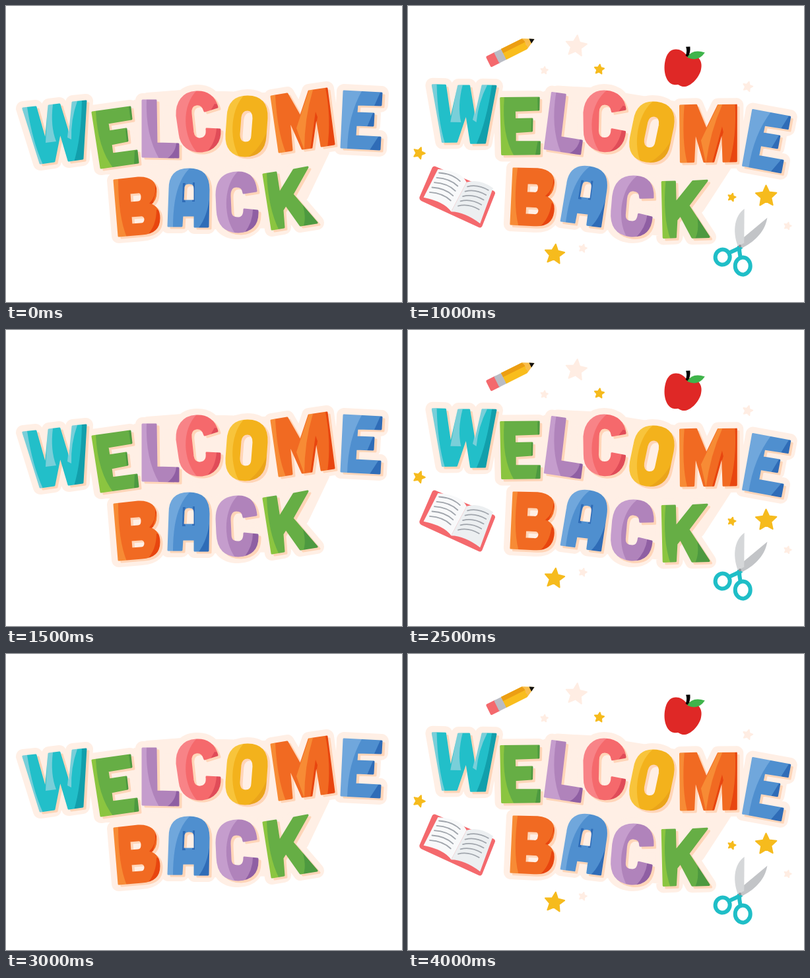
Animation, 600 px wide and 448 px high, one loop 5 s. Source, as an HTML page:

```html
<!DOCTYPE html>
<html lang="en">
<head>
<meta charset="utf-8">
<title>Welcome back</title>
<style>
html, body { margin: 0; width: 100%; height: 100%; overflow: hidden; background: #fff; }
svg { display: block; width: 600px; height: 448px; }
</style>
</head>
<body>
<svg viewBox="0 0 600 448" aria-label="Welcome back">
  <g id="scene">
    <g id="lettering" stroke-linejoin="round"></g>
    <!-- Props are laid out in the left-leaning pose -->
    <g id="props" transform="rotate(7.5 300 224)">
      <g id="stars" stroke-width="2" stroke-linejoin="round"></g>

      <g transform="translate(97 131) rotate(-41.5)">
        <path fill="#f4696d" d="M-5-9H9V9H-5Q-7 9-7 7V-7Q-7-9-5-9Z"/>
        <path fill="#b9bcc4" d="M7-9H20V9H7Z"/>
        <path fill="#f9bd1d" d="M19-9H54L71 0 54 9H19Z"/>
        <path fill="#ec9e13" d="M19-9H54L60-2H19Z"/>
        <path fill="#f8bd4c" d="M54-9L71 0 54 9Q58 5 55 2 58-2 54-9Z"/>
        <path fill="#111" d="M64-4L71 0 64 4Z"/>
      </g>

      <path fill="#df2826" d="M378 47C369 40 350 40 350 62C350 80 360 97 372 96C376 96 377 93 381 95C393 99 406 80 406 64C406 46 390 41 378 47Z"/>
      <path fill="#050505" d="M375 36L381 34Q384 42 382 50L378 49Q379 42 375 36Z"/>
      <path fill="#3fb44b" d="M381 51Q385 36 405 37Q399 54 381 51Z"/>

      <path fill="#f4696d" d="M55 309L150 322Q154 323 153 327L147 378Q146 382 142 381L48 365Q44 364 44 360L51 312Q52 309 55 309Z"/>
      <path fill="#f8f9fa" d="M60 312Q94 305 107 320L96 369Q82 357 50 359Z"/>
      <path fill="#eceff1" d="M107 320Q124 309 148 318L143 375Q116 364 96 369Z"/>
      <g id="lines" fill="none" stroke="#a0a5ac" stroke-width="1.8" stroke-linecap="round"></g>

      <g fill="none" stroke="#1fbec7" stroke-width="6">
        <ellipse cx="511" cy="329" rx="11" ry="11.5"/>
        <ellipse cx="544" cy="334" rx="11.5" ry="13" transform="rotate(-15 544 334)"/>
        <path d="M535 306Q528 313 519 320M531 306Q533 314 537 322"/>
      </g>
      <path fill="#c2c4c7" d="M561 254C563 274 553 293 536 308L527 302Z"/>
      <path fill="#d5d7d9" d="M524 250C513 263 514 286 529 307L537 300Z"/>
      <circle cx="532" cy="306" r="2" fill="#8d9298"/>
    </g>
  </g>
</svg>
<script>
const $ = id => document.getElementById(id);

const teal = ['#22bfc9', '#79cfd9', '#129fab'];
const green = ['#66ae45', '#8bc540', '#4d9940'];
const purple = ['#b083bb', '#c59dcd', '#8f5fa3'];
const coral = ['#f5696c', '#f88387', '#e04c58'];
const yellow = ['#f3b21c', '#f8c43b', '#eaa41a'];
const orange = ['#f16a22', '#f78b35', '#e8450f'];
const blue = ['#4f8fcf', '#70a7dc', '#2f6cb7'];

// Each letter: palette, outline, lit area, shaded area
const letters = [
  [teal, 'M26 155L45 153 60 206 65 151 81 149 96 198 101 146 121 144 116 231 95 234 82 190 73 235 52 238Z',
    'M24 153H32Q40 205 56 240H48ZM63 149H71Q67 182 76 205L60 207ZM99 144H108Q98 172 99 202L93 199Z',
    'M123 142H115Q114 200 103 236H119Z'],
  [green, 'M131 161L188 153 190 171 154 177 156 190 182 186 184 204 159 209 161 224 198 219 200 237 144 245Z',
    'M128 158L136 159Q139 216 163 246L142 248Z',
    'M190 151L186 153 189 173 193 173ZM184 185L181 186 183 206 187 205ZM200 218L195 219 194 240 203 238Z'],
  [purple, 'M207 143L227 143 228 208 261 209 261 229 207 228Z',
    'M205 141H213Q211 195 232 231H205Z',
    'M264 207H258Q257 222 244 231H264Z'],
  [coral, 'M320 153C316 137 304 129 288 130C268 131 258 146 259 166L263 193C265 212 279 221 297 220C315 218 325 206 324 187L304 186C305 194 302 200 295 201C288 202 284 198 283 191L280 163C279 155 282 150 288 149C295 148 299 152 301 159Z',
    'M290 127C265 150 267 200 292 224L255 222V127Z',
    'M326 184H319Q318 207 303 222L328 215ZM322 149L316 148 309 160 322 156Z'],
  [yellow, 'M366 137C386 137 396 148 395 170L393 197C392 217 381 227 362 227C342 226 333 215 334 194L336 167C337 147 346 137 366 137ZM366 157C359 157 356 161 355 168L353 194C353 202 356 207 363 207C369 207 373 203 373 196L375 170C375 161 372 157 366 157Z',
    'M362 134C342 152 336 198 354 230H330V134Z',
    'M397 185Q388 213 366 229H397Z'],
  [orange, 'M402 137L426 133 446 168 459 129 486 125 497 209 478 212 470 164 463 214 449 216 429 171 433 218 414 221Z',
    'M399 135L408 135Q411 190 424 222L411 224ZM459 127L465 127Q452 170 452 218L440 185Z',
    'M489 122L484 124Q493 170 487 214L501 212ZM469 160L472 168 464 217 461 217Z'],
  [blue, 'M512 129L569 132 568 150 532 149 531 162 557 163 556 181 530 180 529 197 567 199 566 217 508 214Z',
    'M509 127H540Q518 165 517 217H505Z',
    'M572 130L567 131 558 151 571 153ZM560 161L556 162 547 183 559 183ZM570 197L564 198 551 218 569 220Z'],
  [orange, 'M164 264L200 260C219 259 227 268 227 281C227 290 225 296 218 300C228 304 232 310 232 321C232 337 223 344 206 345L171 348ZM187 283L199 282C204 281 206 284 206 289C206 294 204 297 200 297L188 298ZM189 318L203 317C208 316 211 319 211 323C211 328 208 330 204 330L190 331Z',
    'M161 261L170 262Q170 318 183 350L168 351Z',
    'M235 310L228 308Q228 333 213 348L235 343ZM229 273L226 272Q228 288 217 299L222 300Z'],
  [blue, 'M248 277C248 256 258 247 277 247C297 247 307 256 307 278L306 334 286 334 286 317 267 317 266 333 246 333Z M277 268C271 268 269 271 269 277L268 295 286 295 286 278C286 271 284 268 277 268Z',
    'M280 244C258 264 253 300 253 336H243V244Z',
    'M309 285Q306 318 291 337H309ZM268 268L272 268Q267 282 272 297L267 297ZM283 267L286 267V296H282Z'],
  [purple, 'M379 280C377 260 367 251 350 252C329 253 319 264 319 286L320 308C321 331 331 342 352 342C372 341 382 331 381 310L361 308C361 317 358 321 351 321C343 321 340 317 340 309L339 287C339 278 342 273 349 273C356 273 359 276 360 283Z',
    'M353 249C330 268 327 318 348 345H315V249Z',
    'M384 308L374 308Q374 327 361 344H384Z'],
  [green, 'M390 255L409 252 414 284 436 248 457 244 434 285 471 328 446 332 424 301 419 309 421 335 403 338Z',
    'M387 253L395 253Q397 306 414 340L401 341Z',
    'M449 299Q456 321 450 335L475 330Z']
];

function letter([[main, light, dark], d, lit, shaded], i) {
  return `<mask id="m${i}" maskUnits="userSpaceOnUse" x="0" y="0" width="600" height="448">
      <path d="${d}" fill="#fff" stroke="#fff" stroke-width="3" fill-rule="evenodd"/></mask>
    <g mask="url(#m${i})"><path d="M0 0H600V448H0Z" fill="${main}"/>
      <path d="${lit}" fill="${light}"/><path d="${shaded}" fill="${dark}"/></g>`;
}

const outlines = letters.map(l => l[1]).join('');
const backing = 'M215 142L266 138 395 142 480 218 448 285 405 325 180 330 168 245 140 190Z';
$('lettering').innerHTML =
  `<path d="${outlines}${backing}" fill="#ffefe5" stroke="#ffefe5" stroke-width="22"/>
   <path d="${outlines}" fill="#ffd5b8" stroke="#ffd5b8" stroke-width="3" fill-rule="evenodd" transform="translate(4 3)"/>` +
  letters.map(letter).join('');

function star(color, x, y, r, turn) {
  const points = Array.from({ length: 10 }, (_, i) => {
    const a = (i * 36 + turn - 90) * Math.PI / 180, q = i % 2 ? r * 0.48 : r;
    return [x + q * Math.cos(a), y + q * Math.sin(a)].map(v => v.toFixed(1));
  });
  return `<polygon points="${points.join(' ')}" fill="${color}" stroke="${color}"/>`;
}

const gold = '#f6bb1d', blush = '#ffede3';
$('stars').innerHTML = [
  [gold, 257, 103, 7.5, -8], [gold, 26, 296, 9, 5], [gold, 551, 223, 16.5, -16],
  [gold, 501, 238, 6, 0], [gold, 264, 391, 15.5, -8],
  [blush, 214, 78, 16.5, -8], [blush, 177, 126, 5.5, -8], [blush, 481, 70, 7.5, 0],
  [blush, 303, 371, 6, 0], [blush, 594, 258, 5.5, 0]
].map(s => star(...s)).join('');

$('lines').innerHTML = Array.from({ length: 5 }, (_, i) => {
  const x = 63 - i * 1.5, y = 317 + i * 8;
  return `<path d="M${x} ${y}q20-4 34 4M${x + 47} ${y + 9}q14-8 32-3"/>`;
}).join('');

// Straight without props, then leaning left, then right; the last pose holds twice as long
const angles = [0, -7.5, 7.5];
function draw() {
  const step = Math.min(Math.floor(performance.now() % 5000 / 500), 8) % 3;
  $('scene').setAttribute('transform', `rotate(${angles[step]} 300 224)`);
  $('props').setAttribute('visibility', step ? 'visible' : 'hidden');
  requestAnimationFrame(draw);
}
draw();
</script>
</body>
</html>
```
